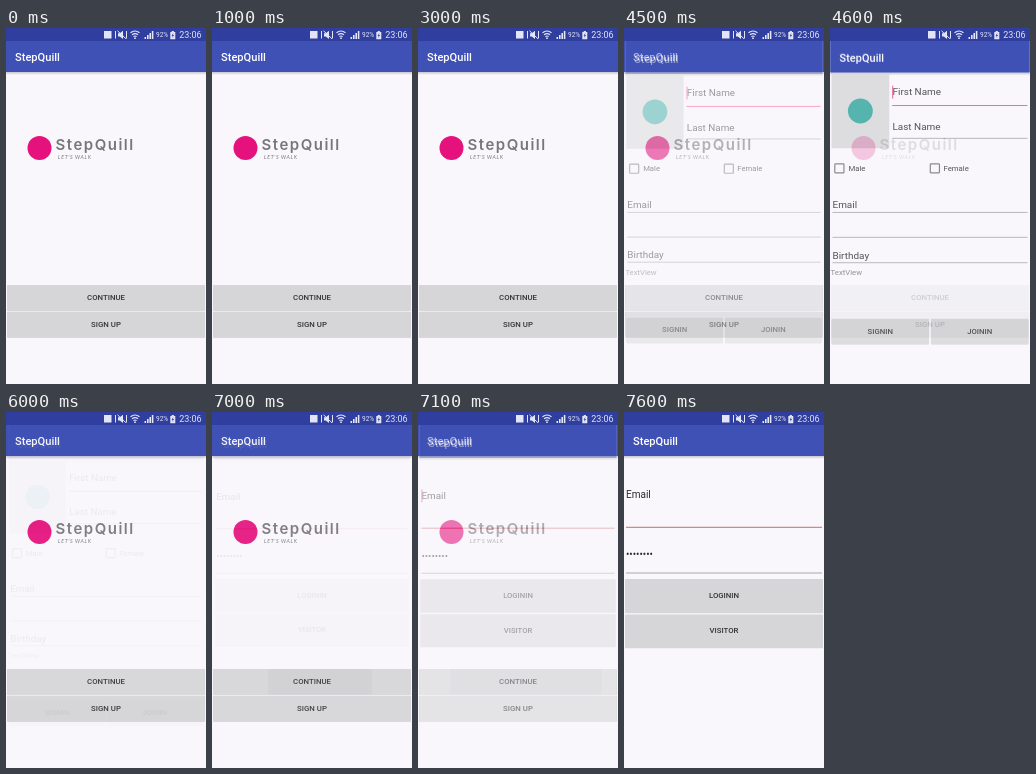
Write an HTML page that moves like this. It is 200 by 356 pixels and loops after 8000 ms.

```html
<!DOCTYPE html>
<html lang="en">
<head>
<meta charset="utf-8">
<title>StepQuill</title>
<style>
  html, body { margin: 0; height: 100%; overflow: hidden; background: #f9f7fc; }
  svg { display: block; width: 100vw; height: 100vh; }
  text { font: 10px Roboto, sans-serif; fill: #2b2b2d; }
  .title { font-size: 11.1px; font-weight: 500; fill: #fff; }
  .small { font-size: 7.8px; }
  .button { font-size: 7.8px; font-weight: 500; fill: #343436; text-anchor: middle; }
  .brand { font: 600 15px Inter, sans-serif; letter-spacing: 1.5px; fill: #77777b; }
  .slogan { font: italic 5.2px Lato, sans-serif; letter-spacing: .7px; fill: #77777b; }
  .status text { fill: #e2e5f6; }
  .line { stroke: #a9a8ab; stroke-width: 1; }
  .box { fill: none; stroke: #6f6f72; stroke-width: 1.2; }
</style>
</head>
<body>
<svg viewBox="0 0 200 356" preserveAspectRatio="none">
  <defs>
    <linearGradient id="shade" x2="0" y2="1">
      <stop stop-color="#000" stop-opacity=".2"/>
      <stop offset="1" stop-color="#000" stop-opacity="0"/>
    </linearGradient>
    <g id="base">
      <rect width="200" height="356" fill="#f9f7fc"/>
      <rect y="44" width="200" height="3" fill="url(#shade)"/>
      <rect width="200" height="44" fill="#3f51b5"/>
      <text class="title" x="9" y="33">StepQuill</text>
    </g>
  </defs>

  <g id="home">
    <use href="#base"/>
    <circle cx="33.5" cy="120" r="12" fill="#e5127d"/>
    <text class="brand" x="49.5" y="122.3">StepQuill</text>
    <text class="slogan" x="52" y="131">LET'S WALK</text>
  </g>

  <g id="form">
    <use href="#base"/>
    <rect x="1" y="45.5" width="58" height="74.5" fill="#d6d6d8"/>
    <circle cx="30" cy="82.5" r="12.5" fill="#2ba59a"/>
    <text x="62.3" y="66.7">First Name</text>
    <text x="62.3" y="101.7">Last Name</text>
    <rect class="box" x="4.3" y="135.6" width="9.2" height="9.2" rx=".8"/>
    <text class="small" x="18" y="143">Male</text>
    <rect class="box" x="100.3" y="135.6" width="9.2" height="9.2" rx=".8"/>
    <text class="small" x="113.5" y="143">Female</text>
    <text x="2" y="180.5">Email</text>
    <text x="2" y="231">Birthday</text>
    <text class="small" x="0" y="247.8" style="fill:#77777a">TextView</text>
  </g>

  <g id="login">
    <use href="#base"/>
    <text x="2" y="86">Email</text>
    <text x="2" y="146.4">••••••••</text>
  </g>

  <g class="status" fill="#e2e5f6">
    <rect width="200" height="13" fill="#303f9f"/>
    <rect x="98" y="3" width="7.5" height="7.5"/>
    <path d="M109.5 3v7.5M120.5 3v7.5M111.5 2.8l8.5 8" stroke="#e2e5f6" fill="none"/>
    <path d="M112 5.3h1.8l3.2-2.6v8.4l-3.2-2.6H112z"/>
    <path d="M124.5 4.8q4.5-3.6 9 0M126 6.8q3-2.3 6 0M127.4 8.5q1.6-1 3.2 0" stroke="#e2e5f6" stroke-width="1.1" fill="none"/>
    <circle cx="129" cy="10.2" r=".9"/>
    <path d="M138.5 11V9h1.6v2zM141 11V7h1.6v4zM143.4 11V5H145v6zM145.8 11V3h1.6v8z"/>
    <text x="150" y="9.4" style="font-size:6.5px">92%</text>
    <path d="M164.3 4h1.4V3h2.2v1h1.4v7.2h-5z"/>
    <path d="M167.4 5l-1.8 2.8h1.1l-.5 2.2 1.9-2.9H167z" fill="#303f9f"/>
    <text x="173.2" y="10.2" style="font-size:9px">23:06</text>
  </g>
</svg>
<script>
const $ = id => document.getElementById(id);

function add(parent, tag, attrs, text = '') {
  const el = document.createElementNS('http://www.w3.org/2000/svg', tag);
  set(el, attrs);
  el.textContent = text;
  return $(parent).appendChild(el);
}

function set(el, attrs) {
  for (const key in attrs) el.setAttribute(key, attrs[key]);
}

function button(parent, label, x, y, width, height) {
  add(parent, 'rect', { x, y: y + .7, width, height, rx: 1, fill: '#000', opacity: .13 });
  add(parent, 'rect', { x, y, width, height, rx: 1, fill: '#d6d6d8' });
  const ripple = add(parent, 'rect', { y, height, rx: 1, opacity: .03 });
  add(parent, 'text', { class: 'button', x: x + width / 2, y: y + height / 2 + 2.2 }, label);
  return ripple;
}

const line = (parent, x1, y) =>
  add(parent, 'line', { class: 'line', x1, x2: 198, y1: y, y2: y });

const cursor = (parent, x, y) =>
  add(parent, 'rect', { x, y, width: 1, height: 13, fill: '#e8407c' });

const continueRipple = button('home', 'CONTINUE', 1, 257, 198, 25.5);
const signUpRipple = button('home', 'SIGN UP', 1, 283.8, 198, 25.5);

const nameLine = line('form', 62, 77);
line('form', 62, 110);
for (const y of [184.5, 209.5, 235]) line('form', 2, y);
const nameCursor = cursor('form', 62, 57);
button('form', 'SIGNIN', 1, 291.3, 98, 25.5);
button('form', 'JOININ', 101, 291.3, 98, 25.5);

line('login', 2, 115.3).style.stroke = '#cf6a6c';
line('login', 2, 161);
const emailCursor = cursor('login', 2, 76);
button('login', 'LOGININ', 1, 167, 198, 33.5);
button('login', 'VISITOR', 1, 202.5, 198, 33);

const clamp = v => Math.max(0, Math.min(1, v));
const between = (t, a, b) => t >= a && t < b;
const show = (el, on) => { el.style.display = on ? '' : 'none'; };

// Pages fade while scaling slightly about the screen centre.
function reveal(id, p) {
  const page = $(id), s = .975 + .025 * p;
  show(page, p > 0);
  set(page, {
    opacity: p,
    transform: `translate(100 178) scale(${s}) translate(-100 -178)`
  });
}

function spread(ripple, center, age) {
  const r = Math.max(0, age) * .236;
  const left = Math.max(1, center - r), right = Math.min(199, center + r);
  set(ripple, { x: left, width: right - left });
  show(ripple, age > 0);
}

function draw(now) {
  // The screen refreshes ten times a second.
  const t = Math.floor(now % 8000 / 100) * 100;
  spread(signUpRipple, 100, t < 5900 ? t - 4080 : 0);
  spread(continueRipple, 108, t - 6780);
  reveal('form', clamp((t - 4370) / 290) * clamp(1 - (t - 5808) / 204));
  reveal('login', clamp((t - 6977) / 290));
  show(nameCursor, between(t, 4400, 5000) || between(t, 5500, 6000));
  show(emailCursor, between(t, 7100, 7500));
  nameLine.style.stroke = t < 4900 ? '#ff4081' : '#c65a74';
  requestAnimationFrame(() => draw(performance.now()));
}
draw(performance.now());
</script>
</body>
</html>
```
